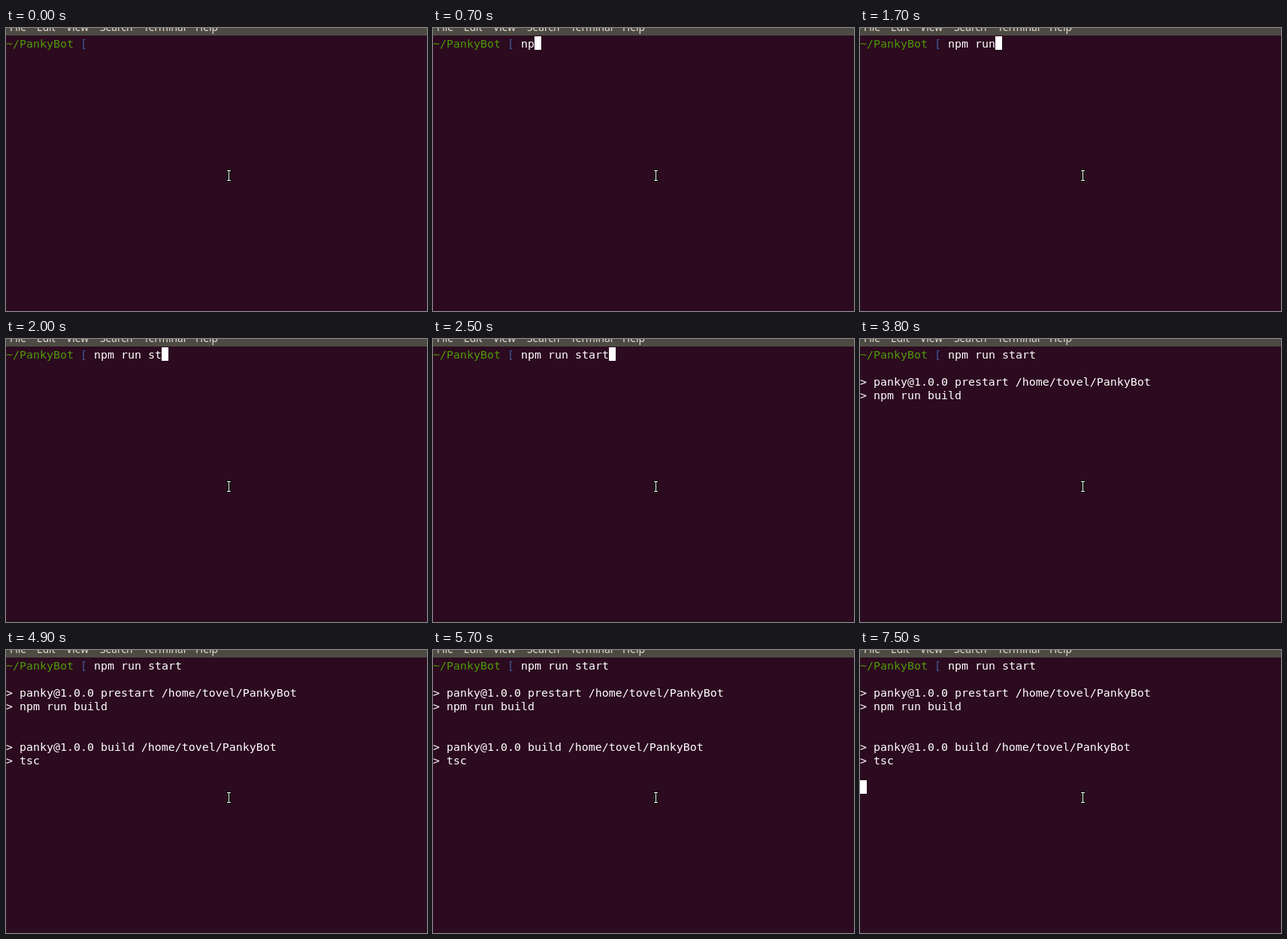
Recreate the animation shown at these times as an HTML page. Size 560x376 px, loop 8 s.

```html
<!DOCTYPE html>
<html lang="en">
<head>
<meta charset="utf-8">
<title>Terminal</title>
<style>
  html, body { margin: 0; width: 100%; height: 100%; overflow: hidden; background: #2c0a1f; }
  svg { display: block; width: 560px; height: 376px; }
  text { white-space: pre; }
  .menu { font: 13.75px "Noto Sans", sans-serif; fill: #e2ded5; }
  .term { font: 14.95px "DejaVu Sans Mono", monospace; fill: #fff; }
</style>
</head>
<body>
<svg viewBox="0 0 560 376">
  <rect width="560" height="376" fill="#2c0a1f"/>
  <rect width="560" height="10" fill="#4c4a43"/>
  <g class="menu" id="menu"></g>
  <g class="term" id="term"></g>
  <rect id="cursor" width="9" height="18" fill="#fff"/>
  <g fill="none">
    <path d="M293 189.5h7M296.5 189v14M293 202.5h7" stroke="#000" stroke-width="3"/>
    <path d="M294 189.5h5M296.5 189v14M294 202.5h5" stroke="#fff"/>
  </g>
</svg>
<script>
const LOOP = 8000, COL = 9, ROW = 18, TOP = 11, BASE = 15;
const $ = id => document.getElementById(id);

function addText(parent, x, y, str, fill) {
  const el = document.createElementNS("http://www.w3.org/2000/svg", "text");
  el.setAttribute("x", x);
  el.setAttribute("y", y);
  if (fill) el.setAttribute("fill", fill), el.style.fill = fill;
  el.textContent = str;
  parent.appendChild(el);
  return el;
}
const cell = (col, row, str, fill) =>
  addText($("term"), col * COL, TOP + row * ROW + BASE, str, fill);

[["File", 5], ["Edit", 41], ["View", 80], ["Search", 125], ["Terminal", 183], ["Help", 252]]
  .forEach(([label, x]) => addText($("menu"), x, 4, label));

cell(0, 0, "~/PankyBot", "#4e9a06");
cell(11, 0, "[", "#3f5a9c");

const CMD_COL = 13, COMMAND = "npm run start";
const keyTimes = [500, 700, 900, 1100, 1400, 1500, 1700, 1800, 1900, 2000, 2200, 2300, 2500];
const command = cell(CMD_COL, 0, "");

const output = [
  [3800, 2, "> panky@1.0.0 prestart /home/tovel/PankyBot"],
  [3800, 3, "> npm run build"],
  [4900, 6, "> panky@1.0.0 build /home/tovel/PankyBot"],
  [4900, 7, "> tsc"]
].map(([at, row, str]) => ({ at, el: cell(0, row, str) }));

// [time, row]; a row of -1 hides the cursor
const cursorSteps = [
  [0, -1], [400, 0], [2800, 1], [3300, -1], [4000, 5], [4500, -1],
  [5100, 9], [5700, -1], [6300, 9], [6900, -1], [7500, 9]
];

function render(t) {
  const typed = keyTimes.filter(k => k <= t).length;
  command.textContent = COMMAND.slice(0, typed);

  for (const { at, el } of output) el.style.display = t >= at ? "" : "none";

  const row = cursorSteps.filter(([at]) => at <= t).pop()[1];
  const cursor = $("cursor");
  cursor.style.display = row < 0 ? "none" : "";
  cursor.setAttribute("x", row === 0 ? (CMD_COL + typed) * COL : 0);
  cursor.setAttribute("y", TOP + Math.max(row, 0) * ROW);
}

const start = performance.now();
function tick() {
  render((performance.now() - start) % LOOP);
  requestAnimationFrame(tick);
}
tick();
</script>
</body>
</html>
```
